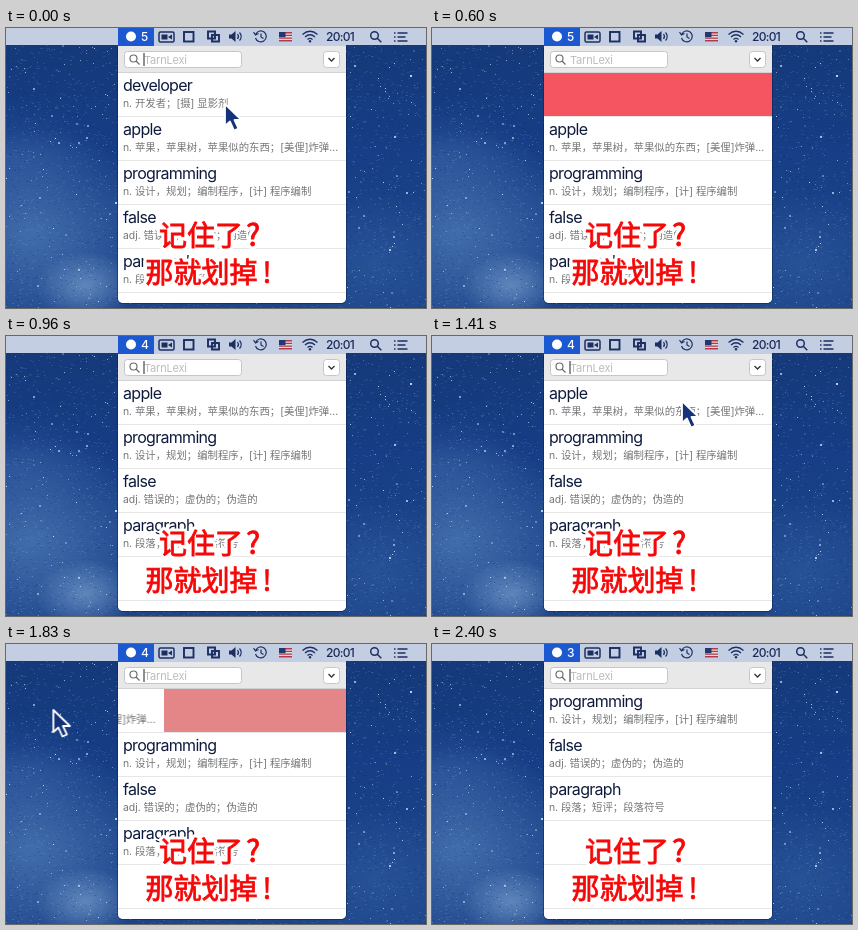
These frames come from a looping animation (420x280 px, 4460 ms). An HTML page with a canvas:

```html
<!DOCTYPE html>
<html lang="zh-CN">
<head>
<meta charset="utf-8">
<title>Word list</title>
<style>
html, body { margin: 0; width: 100%; height: 100%; overflow: hidden; background: #173f87; }
canvas, svg.stage { position: absolute; left: 0; top: 0; width: 420px; height: 280px; }
text { font-family: Inter, "Noto Sans CJK SC", "Noto Sans CJK", sans-serif; }
.word { font-size: 16px; letter-spacing: -.7px; fill: #0f1b3d; }
.gloss { font-size: 10.4px; letter-spacing: -.02px; fill: #747678; }
#caption text { font: 500 28px "Noto Sans CJK SC", "Noto Sans CJK", sans-serif; }
.outline { fill: #fff; stroke: #fff; stroke-width: 7px; stroke-linejoin: round; }
.ink { fill: #f60808; stroke: #f60808; stroke-width: .8px; }
.mark { text-anchor: middle; }
.icon { fill: none; stroke: #1c2f60; stroke-width: 1.5; }
.solid { fill: #1c2f60; stroke: none; }

.stack, .row1, .row2, .red1, .red2, .cursor, .caret, .n5, .n4, .n3 {
  animation: 4460ms linear infinite;
}
.stack { animation-name: stack; }
.row1 { animation-name: row1; }
.row2 { animation-name: row2; }
.red1 { animation-name: red1; }
.red2 { animation-name: red2; }
.cursor { animation-name: cursor; }
.caret { animation-name: caret; animation-timing-function: step-end; }
.n5 { animation-name: n5; animation-timing-function: step-end; }
.n4 { animation-name: n4; animation-timing-function: step-end; }
.n3 { animation-name: n3; animation-timing-function: step-end; }

@keyframes stack {
  0%, 16.81% { transform: translateY(0); }
  16.816% { transform: translateY(-9px); animation-timing-function: ease-out; }
  20.852%, 49.77% { transform: translateY(-44px); }
  49.776% { transform: translateY(-53px); animation-timing-function: ease-out; }
  53.812%, 100% { transform: translateY(-88px); }
}
@keyframes row1 {
  0%, 4.036% { transform: translateX(0); opacity: 1; }
  5.381% { transform: translateX(-12px); }
  6.726% { transform: translateX(-45px); }
  8.072% { transform: translateX(-95px); }
  9.417% { transform: translateX(-157px); }
  10.09% { transform: translateX(-182px); }
  11.659% { transform: translateX(-214px); }
  13.004%, 16.81% { transform: translateX(-228px); opacity: 1; }
  16.816% { transform: translateX(0); opacity: .6; }
  19.5%, 100% { transform: translateX(0); opacity: 0; }
}
@keyframes row2 {
  0%, 34.978% { transform: translateX(0); opacity: 1; }
  36.323% { transform: translateX(-12px); }
  37.668% { transform: translateX(-45px); }
  39.013% { transform: translateX(-95px); }
  40.359% { transform: translateX(-157px); }
  41.031% { transform: translateX(-182px); }
  42.601% { transform: translateX(-214px); }
  43.946%, 49.77% { transform: translateX(-228px); opacity: 1; }
  49.776% { transform: translateX(0); opacity: .6; }
  52.47%, 100% { transform: translateX(0); opacity: 0; }
}
@keyframes red1 {
  0%, 4.036% { fill: #ecdcdc; opacity: 1; }
  10.09% { fill: #e48588; }
  13.004%, 16.81% { fill: #f55560; opacity: 1; }
  16.816%, 100% { fill: #f55560; opacity: 0; }
}
@keyframes red2 {
  0%, 34.978% { fill: #ecdcdc; opacity: 1; }
  41.031% { fill: #e48588; }
  43.946%, 49.77% { fill: #f55560; opacity: 1; }
  49.776%, 100% { fill: #f55560; opacity: 0; }
}
@keyframes cursor {
  0%, 4.036% { transform: translate(219px, 76px); }
  5.381% { transform: translate(189px, 79px); }
  6.726% { transform: translate(156px, 83px); }
  8.072% { transform: translate(105px, 87px); }
  9.417% { transform: translate(44px, 91px); }
  10.09% { transform: translate(16px, 92px); }
  11.659%, 22.42% { transform: translate(-26px, 93px); }
  22.87% { transform: translate(-12px, 92px); }
  26.906% { transform: translate(140px, 77px); }
  28.924% { transform: translate(214px, 68px); }
  31.614%, 34.978% { transform: translate(250px, 65px); }
  36.323% { transform: translate(220px, 65px); }
  37.668% { transform: translate(187px, 65px); }
  39.013% { transform: translate(136px, 65px); }
  40.359% { transform: translate(75px, 65px); }
  41.031% { transform: translate(48px, 66px); }
  42.601% { transform: translate(5px, 66px); }
  43.5%, 100% { transform: translate(-28px, 67px); }
}
@keyframes caret { 0% { opacity: 1; } 11.2% { opacity: 0; } 21.52%, 100% { opacity: 1; } }
@keyframes n5 { 0% { opacity: 1; } 16.81%, 100% { opacity: 0; } }
@keyframes n4 { 0% { opacity: 0; } 16.81% { opacity: 1; } 49.77%, 100% { opacity: 0; } }
@keyframes n3 { 0% { opacity: 0; } 49.77%, 100% { opacity: 1; } }
</style>
</head>
<body>
<canvas id="sky" width="420" height="280"></canvas>
<svg class="stage" viewBox="0 0 420 280">
  <defs>
    <clipPath id="panel"><path d="M112 18H340V270a5 5 0 0 1-5 5H117a5 5 0 0 1-5-5z"/></clipPath>
    <clipPath id="list"><rect x="112" y="45" width="228" height="230"/></clipPath>
    <pattern id="lines" x="0" y="45" width="228" height="44" patternUnits="userSpaceOnUse">
      <rect width="228" height="44" fill="#fff"/>
      <rect y="43" width="228" height="1" fill="#e6e6e6"/>
    </pattern>
    <g id="caption">
      <text x="153" y="218">记住了</text>
      <text class="mark" x="247" y="218" style="font-size:30px">?</text>
      <text x="139.500" y="255">那就划掉</text>
      <text class="mark" x="261" y="255">!</text>
    </g>
  </defs>

  <!-- menu bar -->
  <path d="M0 0H420V17H340V18H112V17H0z" fill="#c4cee3"/>
  <rect x="112" width="36" height="18" fill="#1c58cf"/>
  <circle cx="125" cy="8.500" r="5" fill="#fff"/>
  <g font-size="12" font-weight="500" fill="#fff">
    <text class="n5" x="135" y="13">5</text>
    <text class="n4" x="135" y="13">4</text>
    <text class="n3" x="135" y="13">3</text>
  </g>
  <g class="icon">
    <rect x="153" y="4" width="15" height="10" rx="1.500"/>
    <path class="solid" d="M155.500 6.500h6v5h-6zM162 9l4-2.500v5z"/>
    <rect x="178" y="4" width="9.500" height="9.500" stroke-width="1.900"/>
    <path d="M202 3.500h7v7h-7zM206 7h7v6.500h-7z" stroke-width="1.900"/>
    <path class="solid" d="M223 6.500h2.500l4-3.500v11l-4-3.500H223z"/>
    <path d="M231.500 6q2 2.500 0 5M233.500 4.500q3.500 4 0 8" stroke-width="1.200"/>
    <path d="M249.500 10a5.500 5.500 0 1 0 .3-4M247.500 4l2 3 3-1.500M255 5.500v3.500l2.500 1.500" stroke-width="1.200"/>
    <path d="M296.500 6.500q7.500-6.500 15 0M299 9q5-4.500 10 0M301.500 11.500q2.500-2.200 5 0" stroke-width="1.300"/>
    <circle class="solid" cx="304" cy="13.300" r="1.200"/>
    <circle cx="368.500" cy="7.500" r="3.800"/>
    <path d="M371.300 10.300l4 4"/>
    <path d="M391.500 5h10M391.500 9h8M391.500 13h10M388 5h1.500M388 9h1.500M388 13h1.500" stroke-width="1.700"/>
  </g>
  <rect x="273" y="4" width="13" height="9.500" fill="#e6d9de"/>
  <path d="M273 4.700h13M273 7.400h13M273 10.100h13M273 12.800h13" stroke="#b23a48" stroke-width="1.400"/>
  <rect x="273" y="4" width="6.500" height="5.200" fill="#25376f"/>
  <text x="320" y="13" font-size="12" font-weight="500" letter-spacing="-.7" fill="#1a2a58">20:01</text>

  <!-- panel -->
  <path d="M111.500 18V270a5.500 5.500 0 0 0 5.500 5.500H335a5.500 5.500 0 0 0 5.500-5.500V18" fill="none" stroke="#0a1c45" stroke-opacity=".45"/>
  <g clip-path="url(#panel)">
    <rect x="112" y="18" width="228" height="257" fill="#fff"/>
    <g clip-path="url(#list)">
      <g class="stack">
        <rect x="112" y="45" width="228" height="352" fill="url(#lines)"/>
        <rect class="red1" x="112" y="45" width="228" height="43"/>
        <rect class="red2" x="112" y="89" width="228" height="43"/>
        <g class="row1">
          <rect x="112" y="45" width="228" height="43" fill="#fff"/>
          <text class="word" x="117" y="63">developer</text>
          <text class="gloss" x="117" y="79">n. 开发者；[摄] 显影剂</text>
        </g>
        <g class="row2">
          <rect x="112" y="89" width="228" height="43" fill="#fff"/>
          <text class="word" x="117" y="107">apple</text>
          <text class="gloss" x="117" y="123">n. 苹果，苹果树，苹果似的东西；[美俚]炸弹…</text>
        </g>
        <text class="word" x="117" y="151">programming</text>
        <text class="gloss" x="117" y="167">n. 设计，规划；编制程序，[计] 程序编制</text>
        <text class="word" x="117" y="195">false</text>
        <text class="gloss" x="117" y="211">adj. 错误的；虚伪的；伪造的</text>
        <text class="word" x="117" y="239">paragraph</text>
        <text class="gloss" x="117" y="255">n. 段落；短评；段落符号</text>
      </g>
    </g>
    <rect x="112" y="18" width="228" height="27" fill="#e8e8e9"/>
    <path d="M112 44.500H340" stroke="#d2d2d4"/>
    <rect x="118.500" y="23.500" width="117" height="16" rx="3" fill="#fff" stroke="#c6c6c9"/>
    <g class="icon" style="stroke:#6d6d70;stroke-width:1.2">
      <circle cx="127.500" cy="30.500" r="3.500"/>
      <path d="M130 33l3.500 3.500"/>
    </g>
    <text x="138" y="35.500" font-size="11" letter-spacing="-.2" fill="#bcbcbf">TarnLexi</text>
    <rect class="caret" x="137.500" y="25" width="1" height="13" fill="#222"/>
    <rect x="317.500" y="23.500" width="16" height="16" rx="3" fill="#fff" stroke="#c6c6c9"/>
    <path d="M322.500 30l3 3 3-3" fill="none" stroke="#333" stroke-width="1.300"/>
  </g>

  <g class="cursor">
    <path d="M0 0v22l5-4.500 4 9 4.500-2-4-8.500h7z" fill="#14327a" stroke="#fff" stroke-width="1.800" stroke-linejoin="round"/>
  </g>

  <use href="#caption" class="outline"/>
  <use href="#caption" class="ink"/>
</svg>
<script>
const ctx = document.getElementById('sky').getContext('2d');
const W = 420, H = 280;

let seed = 20;
const rand = () => (seed = (seed * 16807) % 2147483647) / 2147483647;

const base = ctx.createLinearGradient(0, 0, 0, H);
[[0, '#153978'], [.4, '#163d85'], [.7, '#1a4389'], [1, '#1c458a']]
  .forEach(([at, color]) => base.addColorStop(at, color));
ctx.fillStyle = base;
ctx.fillRect(0, 0, W, H);

// soft elliptical glow
function haze(x, y, r, squash, rgb, alpha) {
  ctx.save();
  ctx.translate(x, y);
  ctx.scale(1, squash);
  const g = ctx.createRadialGradient(0, 0, 0, 0, 0, r);
  g.addColorStop(0, `rgba(${rgb},${alpha})`);
  g.addColorStop(1, `rgba(${rgb},0)`);
  ctx.fillStyle = g;
  ctx.fillRect(-r, -r, 2 * r, 2 * r);
  ctx.restore();
}
haze(25, 205, 130, .8, '105,150,205', .5);
haze(80, 258, 50, .7, '150,185,225', .5);
haze(10, 130, 90, .6, '80,125,190', .25);
haze(370, 235, 90, .8, '80,125,190', .25);

// fine grain first, then brighter stars
for (let i = 0; i < 5000; i++) {
  ctx.fillStyle = rand() < .5 ? 'rgba(130,170,220,.16)' : 'rgba(10,35,95,.16)';
  ctx.fillRect(rand() * W | 0, rand() * H | 0, 2, 1);
}
for (let i = 0; i < 800; i++) {
  const x = rand() * W | 0, y = 17 + rand() * (H - 17) | 0;
  const size = rand() < .1 ? 2 : 1;
  ctx.fillStyle = `rgba(215,230,250,${.15 + .75 * rand() ** 2})`;
  ctx.fillRect(x, y, size, size);
}
</script>
</body>
</html>
```
